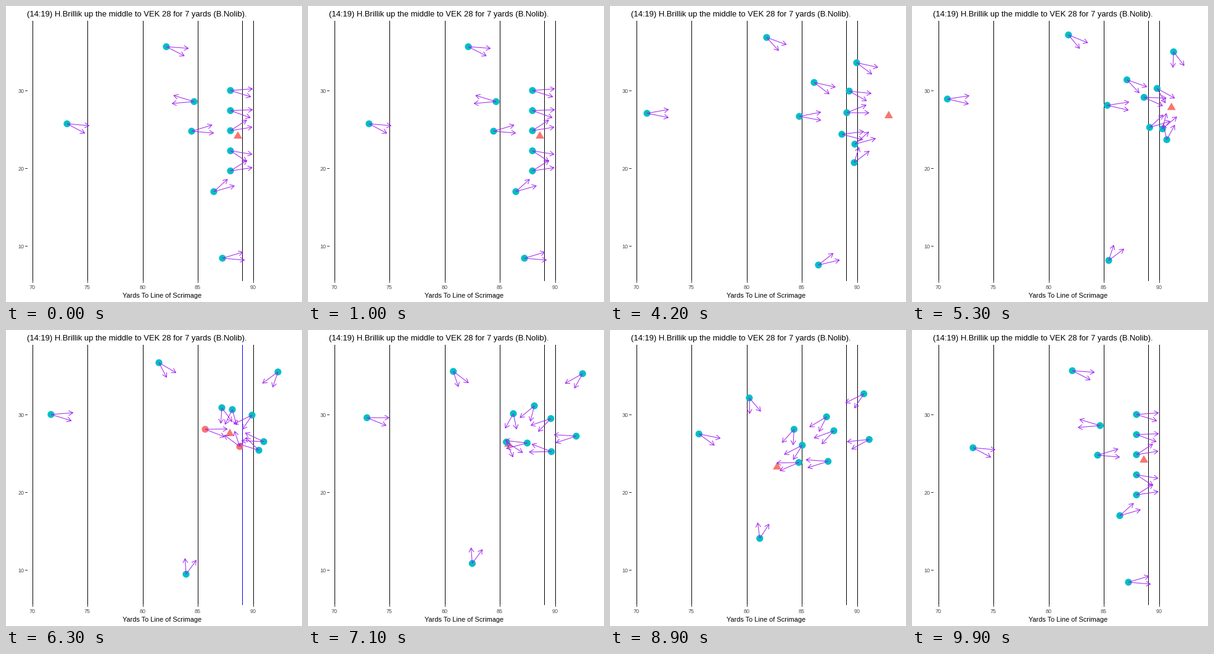
Recreate the animation shown at these times as a matplotlib script. Size 480 by 480 pixels, loop 10000 ms.

```python
import numpy as np
import matplotlib.pyplot as plt
from matplotlib.animation import FuncAnimation
from matplotlib.collections import LineCollection
from matplotlib.patches import Circle, Polygon

SIZE, DPI = 480, 72
LOOP, STEP = 10000, 100
YARD = np.array([17.9, -12.6])          # pixels per yard, y pointing up
TEAL, CORAL, PURPLE = "#00BFC4", "#F8766D", "#A020F0"

# Phases of the play, in ms.
SNAP, RUSH, HANDOFF, HIT, BREAK, END = 1000, 2600, 4200, 6300, 7900, 9700
CONTACT = (5800, 7000)
# The picture is refreshed at these times and restarts at the last one.
TICKS = [0, 100, 200, 300, *range(400, 5201, 200), *range(5300, 9901, 200)]


def ease(ms, begin, end):
    p = np.clip((ms - begin) / (end - begin), 0, 1)
    return p * p * (3 - 2 * p)


def wrap(deg):
    return (deg + 180) % 360 - 180


def unit(deg):
    return np.array([np.cos(np.radians(deg)), np.sin(np.radians(deg))])


def spline(t, v):
    """Natural cubic spline through the points v at times t."""
    t = np.asarray(t) / 1000
    n, h = len(t), np.diff(t)
    a, rhs = np.eye(n), np.zeros_like(v)
    slope = np.diff(v, axis=0) / h[:, None]
    for i in range(1, n - 1):
        a[i, i - 1:i + 2] = h[i - 1], 2 * (h[i - 1] + h[i]), h[i]
        rhs[i] = 6 * (slope[i] - slope[i - 1])
    m = np.linalg.solve(a, rhs)

    def at(ms):
        s = ms / 1000
        i = int(np.clip(np.searchsorted(t, s, "right") - 1, 0, n - 2))
        p, q = t[i + 1] - s, s - t[i]
        return ((m[i] * p**3 + m[i + 1] * q**3) / (6 * h[i])
                + (v[i] / h[i] - m[i] * h[i] / 6) * p
                + (v[i + 1] / h[i] - m[i + 1] * h[i] / 6) * q)
    return at


def route(start, handoff, hit, brk, end):
    """Wait for the snap, speed up to the handoff, then pass the waypoints."""
    start, handoff = np.array(start, float), np.array(handoff, float)
    rush = start + (handoff - start) / 4
    points = np.array([start, start, rush, handoff, hit, brk, end], float)
    return spline([0, SNAP, RUSH, HANDOFF, HIT, BREAK, END], points)


TACKLE = np.array([254, 230])
ball_path = route((376, 211), (452, 178), (363, 168), (297, 206), TACKLE)


class Player:
    """A defender who turns from a first angle to the ball and closes in."""

    def __init__(self, angle, watch, start, handoff, hit, brk):
        last = np.array(brk) + 0.3 * (TACKLE - brk)
        self.path = route(start, handoff, hit, brk, last)
        self.angle, self.watch = angle, watch
        self.dot = Circle((0, 0), 5.6, lw=0, zorder=3)

    def pose(self, ms, ball):
        pos = self.path(ms)
        gap = (ball - pos) / YARD
        turn = wrap(np.degrees(np.arctan2(gap[1], gap[0])) - self.angle)
        facing = self.angle + turn * ease(ms, *self.watch)
        return pos, facing, np.hypot(*gap)


EARLY, LATE = (SNAP, RUSH), (RUSH, HIT)

players = [
    # Secondary
    Player(-22, EARLY, (99, 191), (60, 174), (73, 137), (120, 155)),
    Player(-21, EARLY, (260, 66), (254, 51), (248, 53), (225, 86)),
    Player(8, LATE, (351, 409), (338, 420), (292, 396), (247, 360)),
    # Linebackers
    Player(172, EARLY, (305, 155), (331, 124), (350, 126), (312, 147)),
    Player(8, EARLY, (301, 203), (307, 179), (323, 161), (316, 205)),
    Player(37, EARLY, (337, 301), (396, 254), (410, 195), (375, 207)),
]
# The front five line up evenly; each has an angle and three waypoints.
front = [
    (-9, (400, 92), (441, 68), (438, 81)),
    (-12, (388, 138), (399, 138), (383, 151)),
    (28, (384, 173), (367, 129), (366, 126)),
    (-28, (376, 208), (379, 189), (329, 181)),
    (27, (397, 224), (418, 181), (443, 170)),
]
for i, (angle, *points) in enumerate(front):
    players.append(Player(angle, LATE, (364, 137 + 32.6 * i), *points))


def arrow(start, deg, length=2, head=8):
    """Shaft and open head of an arrow of the given length in yards."""
    tip = start + length * unit(deg) * YARD
    dx, dy = start - tip
    back = np.degrees(np.arctan2(dy, dx))
    barbs = [tip + head * unit(back + s) for s in (-30, 30)]
    return [[start, tip], [barbs[0], tip, barbs[1]]]


fig = plt.figure(figsize=(SIZE / DPI, SIZE / DPI), dpi=DPI, facecolor="white")
ax = fig.add_axes([0, 0, 1, 1])
ax.set(xlim=(0, SIZE), ylim=(SIZE, 0))
ax.axis("off")


def line(xs, ys, color):
    return ax.plot(xs, ys, color=color, lw=1, antialiased=False,
                   solid_capstyle="butt", zorder=1)[0]


def label(x, y, text, size, color="black", ha="center"):
    ax.text(x, y, text, size=size, color=color, ha=ha, va="baseline",
            family="Liberation Sans")


def yard_line(yard):
    x = int(43 + YARD[0] * (yard - 70))
    return x, line([x, x], [24, 445], "black")


for yard in range(70, 91, 5):
    x, _ = yard_line(yard)
    line([x, x], [445, 448], "#333333")
    label(x, 459, str(yard), 9, "#4D4D4D")
_, scrimmage = yard_line(89)
for yard in (10, 20, 30):
    y = 389 + YARD[1] * (yard - 10)
    line([31, 34], [y, y], "#333333")
    label(29.5, y + 4, str(yard), 9, "#4D4D4D", "right")

label(33.5, 17, "(14:19) H.Brillik up the middle to VEK 28 for 7 yards (B.Nolib).",
      13, ha="left")
label(253.5, 473, "Yards To Line of Scrimage", 11)

TRIANGLE = 8 * np.array([[0, -1], [0.866, 0.5], [-0.866, 0.5]])
ball = ax.add_patch(Polygon(TRIANGLE, color=CORAL, lw=0, zorder=3))
arrows = ax.add_collection(LineCollection([], colors=PURPLE, linewidths=1,
                                          zorder=4))
for p in players:
    ax.add_patch(p.dot)


def update(i):
    ms = TICKS[np.searchsorted(TICKS, i * STEP, "right") - 1]
    ms %= TICKS[-1]
    contact = CONTACT[0] < ms < CONTACT[1]
    at = ball_path(ms)
    ball.set_xy(at + TRIANGLE)
    scrimmage.set_color("blue" if contact else "black")
    segments = []
    for p in players:
        pos, facing, distance = p.pose(ms, at)
        p.dot.center = pos
        p.dot.set_facecolor(CORAL if contact and distance < 2.6 else TEAL)
        for side in (-15, 15):
            segments += arrow(pos, facing + side)
    arrows.set_segments(segments)
    return [scrimmage, ball, arrows, *(p.dot for p in players)]


anim = FuncAnimation(fig, update, frames=LOOP // STEP, interval=STEP,
                     repeat=True, repeat_delay=0)
plt.show()
```
